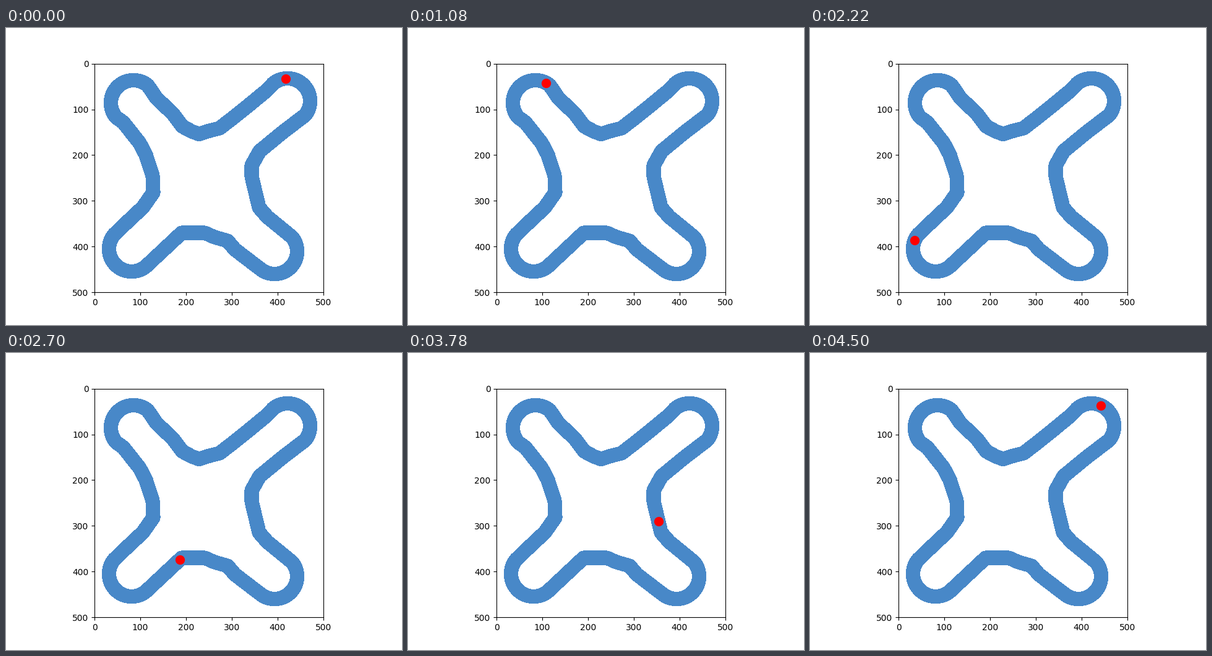
A matplotlib script for the animation above (4.56 s loop, 640x480 px).

```python
import numpy as np
import matplotlib.pyplot as plt
from matplotlib.animation import FuncAnimation

W, H, DPI = 640, 480, 100
FRAMES, STEP_MS = 76, 60
SIDE = 369.6                # plot side in pixels
LEFT, TOP = 143.2, 57.6     # plot corner in pixels
SPAN = 500
BAND = 22.2                 # track width in pixels
RADIUS = 36.5               # centre line of the round ends
SAMPLES = 2000

# Centres of the four round ends, anticlockwise from the top right, and the
# bends of the track after each of them, in stage pixels.
ENDS = [(455, 118), (206, 121), (203, 357), (434, 361)]
BENDS = [
    [(420, 102), (386, 130), (362, 149), (345, 162), (329, 166),
     (312, 171.5), (300, 167), (285, 159), (270, 139), (243, 113)],
    [(190, 153), (216, 186), (226, 205), (237, 239), (238, 266),
     (221, 290), (188, 321)],
    [(284, 331), (321, 331), (337, 338), (358, 344), (370, 358)],
    [(422, 305), (409, 290), (397, 240), (397, 222), (410, 199), (449, 167)],
]

# Frame number and place of the dot; it runs evenly in between.
KEYS = [(0, 451.5, 82), (10, 319, 171), (18, 223, 90), (26, 216, 187),
        (37, 169, 342.5), (45, 281.5, 334), (54, 455, 392), (63, 403, 273),
        (72, 491, 124), (75, 470, 85)]


def round_end(k):
    """Arc around end k, facing away from the middle of the stage."""
    a = np.radians(45 + 90 * k + np.linspace(-84, 84, 40))
    return ENDS[k] + RADIUS * np.column_stack([np.cos(a), -np.sin(a)])


def resample(ring):
    """Evenly spaced points along a closed ring."""
    dist = np.r_[0, np.cumsum(np.hypot(*np.diff(ring, axis=0).T))]
    s = np.linspace(0, dist[-1], SAMPLES, endpoint=False)
    return np.column_stack([np.interp(s, dist, axis) for axis in ring.T])


def dot_path(route):
    """Dot position for every frame."""
    keys = np.array(KEYS + [(FRAMES, *KEYS[0][1:])])
    stops = [np.argmin(np.hypot(*(route - key[1:]).T)) for key in keys]
    stops = np.unwrap(np.array(stops, float), period=SAMPLES)
    s = np.interp(np.arange(FRAMES), keys[:, 0], stops)
    return route[s.round().astype(int) % SAMPLES]


def to_data(pts):
    return (pts - np.array([LEFT, TOP])) * SPAN / SIDE


ring = np.vstack([part for k in range(4) for part in (round_end(k), BENDS[k])])
ring = np.vstack([ring, ring[:1]])
track = to_data(ring)
spots = to_data(dot_path(resample(ring)))

fig = plt.figure(figsize=(W / DPI, H / DPI), dpi=DPI)
ax = fig.add_axes([LEFT / W, 1 - (TOP + SIDE) / H, SIDE / W, SIDE / H])
ax.set(xlim=(0, SPAN), ylim=(SPAN, 0),
       xticks=range(0, SPAN + 1, 100), yticks=range(0, SPAN + 1, 100))
ax.plot(*track.T, color="#4888c8", lw=BAND * 72 / DPI, antialiased=False,
        solid_joinstyle="round", solid_capstyle="round")
dot, = ax.plot([], [], "o", color="red", markersize=10)


def update(i):
    dot.set_data(spots[i:i + 1, 0], spots[i:i + 1, 1])
    return dot,


anim = FuncAnimation(fig, update, frames=FRAMES, interval=STEP_MS,
                     repeat=True, repeat_delay=0, blit=True)
plt.show()
```
